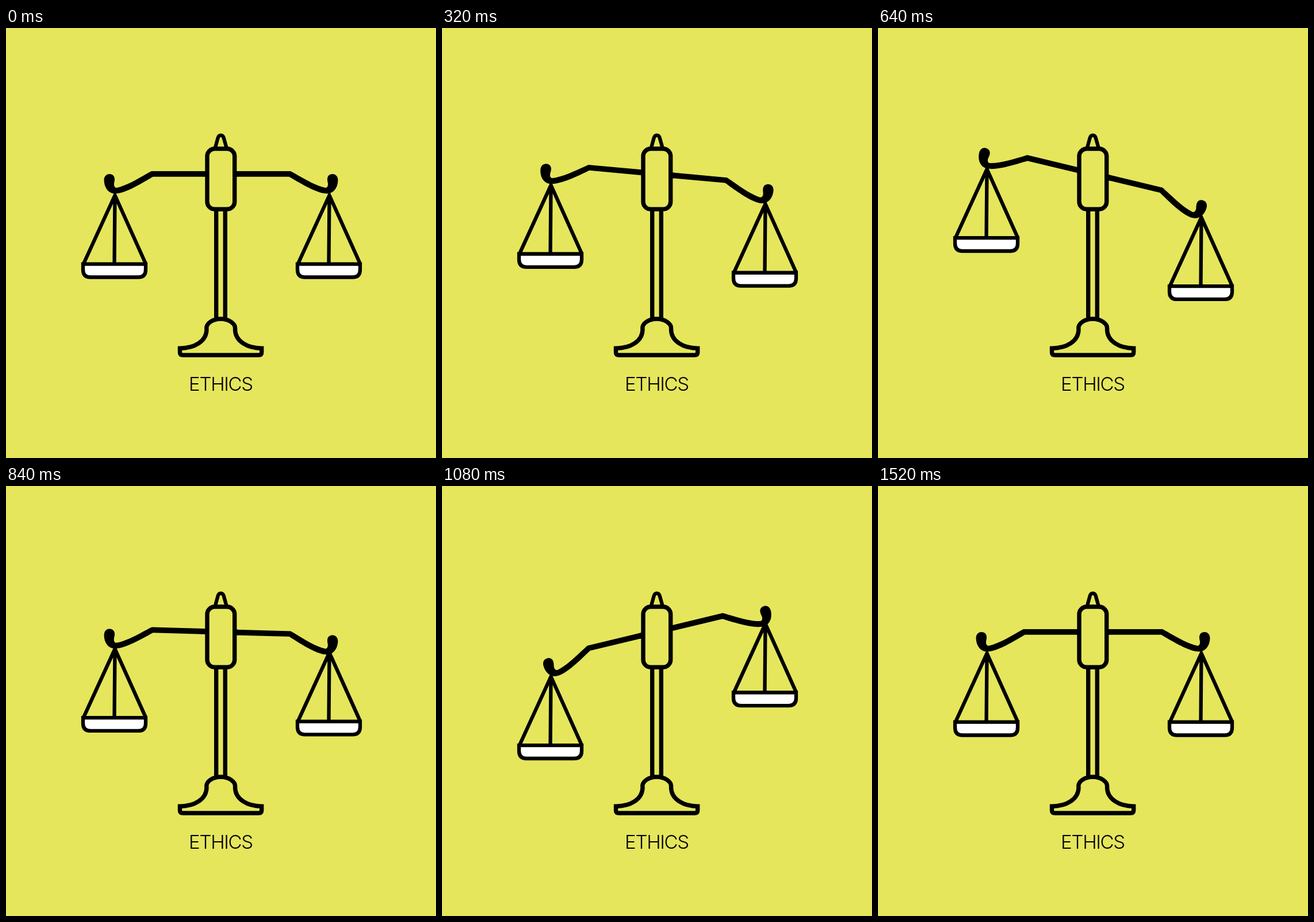
Write an HTML page that moves like this. It is 748x748 px and loops after 1.92 s.

```html
<!DOCTYPE html>
<html lang="en">
<head>
<meta charset="utf-8">
<title>Ethics</title>
<style>
  html, body { margin: 0; width: 100%; height: 100%; overflow: hidden; background: #e5e65c; }
  svg { display: block; width: 100vw; height: 100vh; }
  .line { fill: none; stroke: #000; stroke-width: 7.4; }
  .thin { stroke-width: 6.3; }
  text { font: 300 33px Inter, Lato, sans-serif; letter-spacing: -1.3px; text-anchor: middle; }
</style>
</head>
<body>
<svg viewBox="0 0 748 748">
  <defs>
    <path id="arm" d="M350 249H253C236 258 212 274 192 278C188.5 277.5 187.5 274 188 270
      C189 266 189.2 263 188.8 261C188 256.5 184.5 254 180 254C174.5 254 170.5 258 170.5 265
      C171 280 180 288 189 288C206 289 238 269 255.5 258.7H350Z"/>
    <g id="pan" class="line thin">
      <path d="M135 410L189.5 291L243 410M189.5 291L188.5 410"/>
      <path fill="#fff" d="M134 410.7H243V420.5Q243 433.5 230 433.5H147Q134 433.5 134 420.5Z"/>
    </g>
  </defs>

  <g id="beam">
    <use href="#arm"/>
    <use href="#arm" transform="matrix(-1 0 0 1 748 0)"/>
    <path class="line" style="stroke-width:9.7" d="M345 253.85H403"/>
  </g>
  <g id="left"><use href="#pan"/></g>
  <g id="right"><use href="#pan" x="373"/></g>

  <path class="line" d="M365.7 316V506M381.3 316V506"/>
  <path class="line thin" d="M363.5 210L368.7 191Q370 186.6 373.7 186.6T378.7 191L384 210"/>
  <rect class="line" style="fill:#e5e65c" x="350" y="210" width="47.7" height="105.3" rx="13"/>
  <path class="line" d="M302.5 557.2C328 557 349 545 349 524C347 514 360 506 373.5 506
    S400 514 398.5 524C398.5 545 420 557 444.7 557.2V564Q444.7 569 439.5 569H308Q302.5 569 302.5 564Z"/>
  <text x="373.5" y="630.5">ETHICS</text>
</svg>
<script>
  const LOOP = 1920, STEP = 40;
  // time, beam angle, left pan offset, right pan offset
  const KEYS = [
    [0, 0, 0, 0],
    [120, 0, 0, 0],
    [600, 14, -47, 40],
    [1120, -14, 42, -53],
    [1520, 0, 0, 0],
    [LOOP, 0, 0, 0]
  ];
  const [beam, left, right] = ['beam', 'left', 'right'].map(id => document.getElementById(id));
  const ease = u => u * u * (3 - 2 * u);

  function pose(t) {
    const i = KEYS.findIndex(k => k[0] > t);
    const a = KEYS[i - 1], b = KEYS[i];
    const e = ease((t - a[0]) / (b[0] - a[0]));
    return a.map((v, n) => v + (b[n] - v) * e);
  }

  function draw() {
    const t = Math.floor((performance.now() - start) % LOOP / STEP) * STEP;
    const [, angle, ly, ry] = pose(t);
    beam.setAttribute('transform', `rotate(${angle} 374 264)`);
    left.setAttribute('transform', `translate(0 ${ly})`);
    right.setAttribute('transform', `translate(0 ${ry})`);
    requestAnimationFrame(draw);
  }

  const start = performance.now();
  draw();
</script>
</body>
</html>
```
